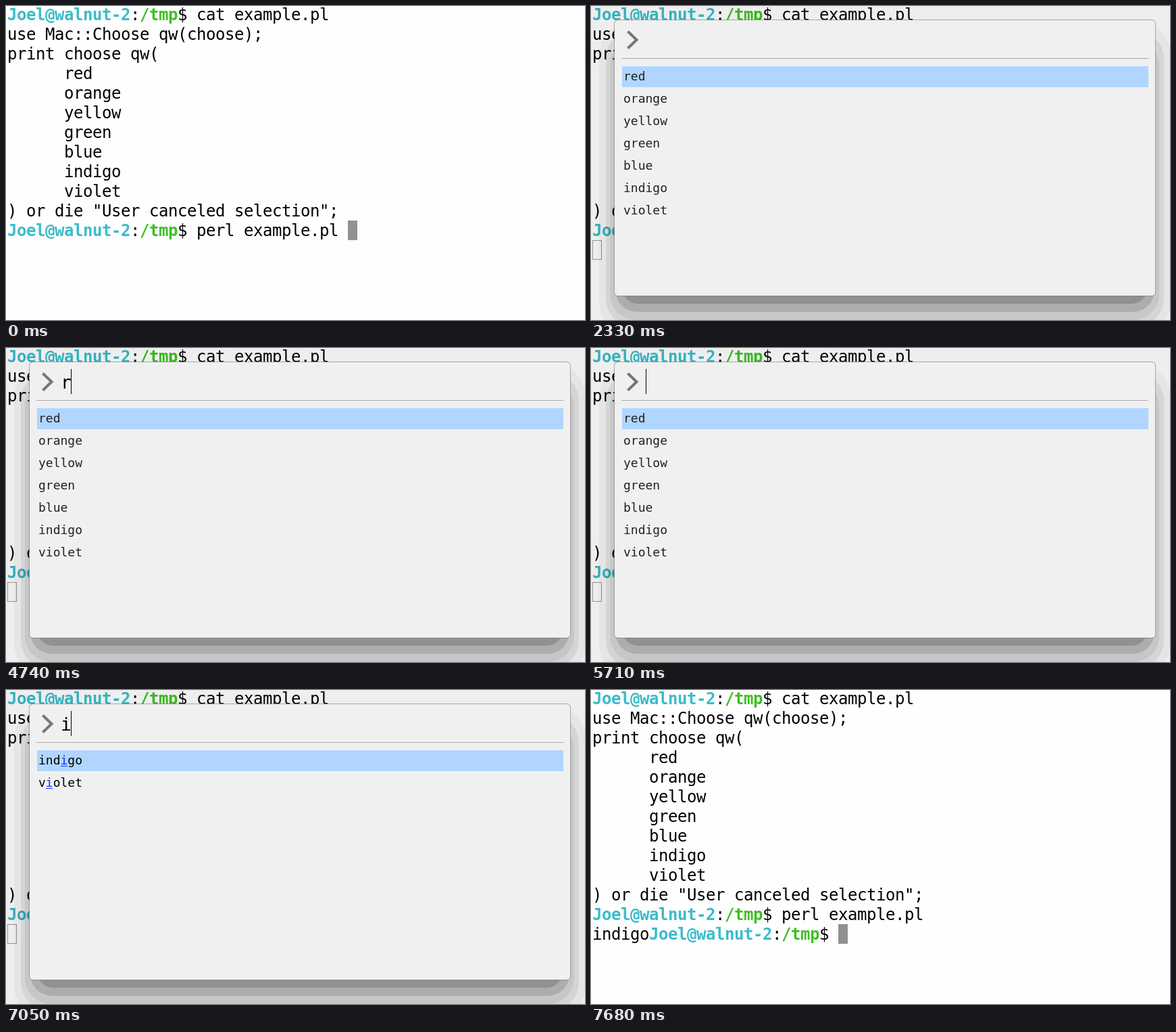
Animation, 857 px wide and 464 px high, one loop 8 s. Source, as an HTML page:

```html
<!DOCTYPE html>
<html lang="en">
<head>
<meta charset="utf-8">
<title>Terminal chooser</title>
<style>
  html, body { margin: 0; width: 100%; height: 100%; overflow: hidden; background: #fefefe; }
  svg { display: block; width: 857px; height: 464px; }
  text { font-family: "DejaVu Sans Mono", "Liberation Mono", monospace; white-space: pre; }
  .term text { font-size: 24px; letter-spacing: -.45px; }
  .user { fill: #3bbcca; font-weight: bold; }
  .path { fill: #3fbf24; font-weight: bold; }
  .item { font-size: 18px; }
  .hit { fill: #0a33ff; }
  #query { font-size: 26px; }
</style>
</head>
<body>
<svg id="stage" viewBox="0 0 857 464">
  <rect width="857" height="464" fill="#fefefe"/>
  <g class="term">
    <rect id="block"/>
    <g id="lines"></g>
  </g>
  <g id="panel">
    <g id="shadow"></g>
    <rect x="34.5" y="20.5" width="801" height="408" rx="5.5" fill="#f0f0f0" stroke="#000" stroke-opacity=".3"/>
    <polyline points="54.5,37.5 67.5,50 54.5,62.5" fill="none" stroke="#777" stroke-width="4"/>
    <rect x="45" y="77" width="780" height="1" fill="#ababab"/>
    <rect id="select" x="46" width="779" height="31" fill="#b0d6ff"/>
    <g id="items"></g>
    <text id="query" x="81" y="60"></text>
    <rect id="caret" y="31" width="1" height="37"/>
  </g>
</svg>
<script>
const LOOP = 8000;
const CELL = 14, ROW = 29;
const ITEM_CHAR = 18 * 0.602, QUERY_CHAR = 26 * 0.602;
const COLORS = ["red", "orange", "yellow", "green", "blue", "indigo", "violet"];
const $ = id => document.getElementById(id);

function add(parent, tag, attrs, content = "") {
  const el = document.createElementNS("http://www.w3.org/2000/svg", tag);
  set(el, attrs);
  el.textContent = content;
  parent.appendChild(el);
  return el;
}

function set(el, attrs) {
  for (const key in attrs) el.setAttribute(key, attrs[key]);
}

function write(col, row, content, cls = "") {
  return add($("lines"), "text", { x: 2 + col * CELL, y: 21 + row * ROW, class: cls }, content);
}

function prompt(col, row, command) {
  return [
    write(col, row, "Joel@walnut-2", "user"),
    write(col + 13, row, ":"),
    write(col + 14, row, "/tmp", "path"),
    write(col + 18, row, "$ " + command)
  ];
}

prompt(0, 0, "cat example.pl");
write(0, 1, "use Mac::Choose qw(choose);");
write(0, 2, "print choose qw(");
COLORS.forEach((name, i) => write(6, 3 + i, name));
write(0, 10, ') or die "User canceled selection";');
prompt(0, 11, "perl example.pl");
const result = [write(0, 12, "indigo"), ...prompt(6, 12, "")];

// Stepped window shadow: left, top, right, bottom, radius, opacity
[
  [-1, -1, 858, 465, 0, .063],
  [12, 24, 858, 486, 48, .038],
  [22, 36, 848, 474, 42, .07],
  [28, 48, 841, 464, 38, .065],
  [36, 60, 834, 452, 32, .13],
  [46, 80, 824, 440, 24, .16]
].forEach(([l, t, r, b, rx, a]) =>
  add($("shadow"), "rect", { x: l, y: t, width: r - l, height: b - t, rx, opacity: a }));

// Time, typed text, applied filter, selected row, caret shown
const STATES = [
  [0, "", "", 0, 1],
  [1250, "", "", 0, 0],
  [1790, "", "", 0, 1],
  [2330, "", "", 0, 0],
  [2960, "b", "", 0, 1],
  [3040, "b", "b", 0, 1],
  [3310, "bl", "b", 0, 1],
  [3400, "bl", "bl", 0, 1],
  [3850, "b", "b", 0, 1],
  [3940, "", "b", 0, 1],
  [4030, "", "", 0, 1],
  [4570, "", "", 0, 0],
  [4740, "r", "", 0, 1],
  [4830, "r", "r", 0, 1],
  [4920, "re", "re", 0, 1],
  [5000, "red", "re", 0, 1],
  [5090, "red", "red", 0, 1],
  [5360, "re", "red", 0, 1],
  [5450, "re", "re", 0, 1],
  [5540, "r", "r", 0, 1],
  [5630, "", "r", 0, 1],
  [5710, "", "", 0, 1],
  [5890, "i", "i", 0, 1],
  [6430, "i", "i", 0, 0],
  [6600, "i", "i", 1, 0],
  [6870, "i", "i", 0, 0],
  [7050, "i", "i", 0, 1]
];

let shownFilter = null;

function drawItems(filter) {
  if (filter === shownFilter) return;
  shownFilter = filter;
  const box = $("items");
  box.textContent = "";
  COLORS.filter(name => name.includes(filter)).forEach((name, i) => {
    const y = 110 + i * 33;
    const line = add(box, "text", { x: 48, y, class: "item", fill: filter ? "#000" : "#222" });
    const at = filter ? name.lastIndexOf(filter) : name.length;
    const end = at + filter.length;
    add(line, "tspan", {}, name.slice(0, at));
    add(line, "tspan", { class: "hit" }, name.slice(at, end));
    add(line, "tspan", {}, name.slice(end));
    if (filter) add(box, "rect", {
      x: 48 + Math.round(at * ITEM_CHAR), y: y + 2,
      width: Math.floor(filter.length * ITEM_CHAR), height: 1, class: "hit"
    });
  });
}

function drawBlock(col, row, hollow) {
  const inset = hollow ? .5 : 0;
  set($("block"), {
    x: 2 + col * CELL + inset, y: -2 + row * ROW + inset,
    width: CELL - 2 * inset, height: ROW - 2 * inset,
    fill: hollow ? "none" : "#919191", stroke: hollow ? "#9c9c9c" : "none"
  });
}

function draw(t) {
  const done = t >= 7590;
  if (t < 500) drawBlock(36, 11, false);
  else if (done) drawBlock(26, 12, t < 7680);
  else drawBlock(0, 12, t >= 590);
  result.forEach(el => set(el, { visibility: done ? "visible" : "hidden" }));

  set($("panel"), { opacity: t < 590 || done ? 0 : t < 680 ? .5 : 1 });
  const [, typed, filter, row, caret] = STATES.findLast(s => s[0] <= t);
  drawItems(filter);
  $("query").textContent = typed;
  set($("select"), { y: 89 + row * 33 });
  set($("caret"), { x: 81 + Math.floor(typed.length * QUERY_CHAR), opacity: caret });
}

const start = performance.now();
function tick() {
  draw((performance.now() - start) % LOOP);
  requestAnimationFrame(tick);
}
tick();
</script>
</body>
</html>
```
